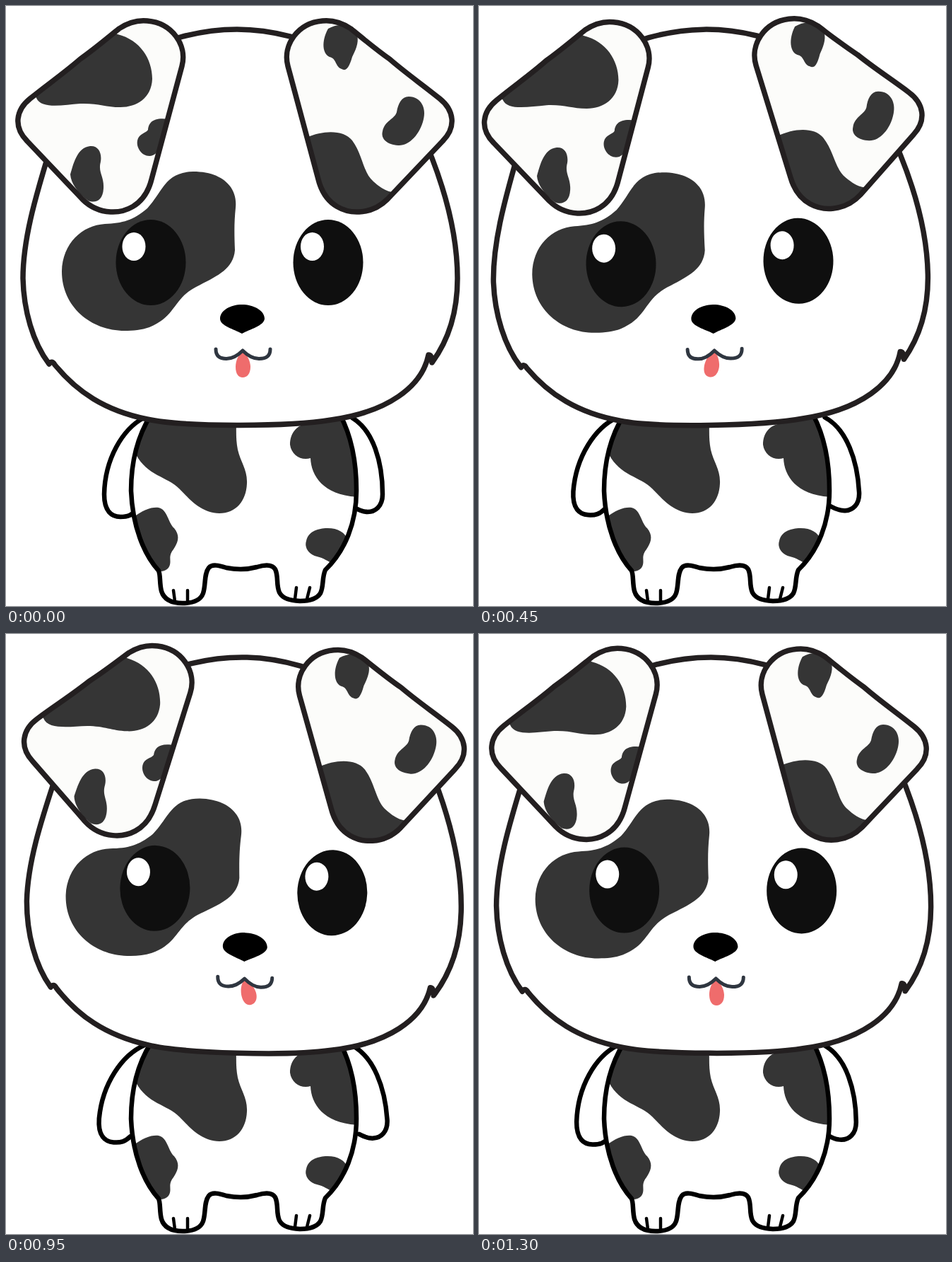
An HTML page for the animation above (1350 ms loop, 661 by 848 pixels).

```html
<!DOCTYPE html>
<html lang="en">
<head>
<meta charset="utf-8">
<title>Wobbling puppy</title>
<style>
  html, body { margin: 0; width: 100%; height: 100%; overflow: hidden; background: #fff; }
  svg { display: block; width: 100%; height: 100%; }
  .line { fill: none; stroke: #000; stroke-width: 6.5; stroke-linejoin: round; stroke-linecap: round; }
  .head { stroke: #231f20; stroke-width: 7.5; }
  .white { fill: #fff; }
  .ear { fill: #fcfcfa; }
  .spot { fill: #353535; }
  .eye { fill: #0f0f0f; }
</style>
</head>
<body>
<svg viewBox="0 0 661 848">
  <defs>
    <path id="bodyShape" d="M205 578C185 610 177 645 177 685C179 735 195 775 216 798C219 805 217 815 220 827C224 840 236 844 250 844C264 844 275 841 279 830C283 818 280 803 287 794C292 788 302 791 312 794C328 797 340 797 355 793C365 790 376 788 381 796C386 806 382 818 387 829C392 838 402 840 416 841C430 841 440 838 445 830C450 820 447 808 452 797C480 770 496 730 496 685C496 645 490 610 473 578Z"/>
    <path id="earShape" d="M160 32C175 22 190 20 200 21C235 24 257 55 249 85L206 245C196 285 165 292 148 291C130 290 118 283 108 273L30 191C10 171 14 147 34 131C60 110 82 95 105 75C125 61 145 44 160 32Z"/>
    <clipPath id="bodyClip"><use href="#bodyShape"/></clipPath>
    <clipPath id="earClip"><use href="#earShape"/></clipPath>
    <clipPath id="mirrorClip"><use href="#earShape" transform="matrix(-1 0 0 1 648 0)"/></clipPath>
  </defs>

  <path id="armL" class="line white" d="M195 582C165 598 140 640 139 690C139 715 150 722 162 722C172 722 178 720 185 712"/>
  <path id="armR" class="line white" d="M490 582C520 600 533 645 533 690C533 708 522 715 512 715C505 715 500 713 492 708"/>

  <use href="#bodyShape" class="white"/>
  <g class="spot" clip-path="url(#bodyClip)">
    <path d="M195 575H326C326 600 325 612 328 627C332 645 342 655 341 675C340 700 325 717 302 717C275 716 260 697 245 682C228 665 200 664 184 634Z"/>
    <path d="M178 724C195 712 205 708 216 709C229 712 229 730 238 738C248 750 242 760 237 768C228 779 236 785 230 794Q226 799 218 799L180 780Z"/>
    <path d="M428 590C410 592 402 605 402 620C404 635 418 643 431 639C432 665 450 692 500 694V575H430Z"/>
    <path d="M452 738C468 737 480 743 484 755L470 790L463 788C455 785 450 780 440 778C428 775 422 765 425 756C428 743 440 739 452 738Z"/>
  </g>
  <use href="#bodyShape" class="line"/>
  <path class="line" style="stroke-width:4.5" d="M237 826L239 841M257 826V841M411 822L409 838M430 822L426 838"/>

  <g id="head">
    <path class="line head white" d="M327 33C230 33 100 85 57 220C42 270 24 330 24 385C25 430 38 476 61 506Q65 500 69 507C100 545 140 572 200 584C250 595 400 595 460 585C540 574 589 538 598 493Q603 493 603 504C628 470 639 430 639 385C639 340 630 285 603 215C555 85 420 33 327 33Z"/>
    <path class="spot" d="M265 234C305 234 328 255 325 285C323 305 323 320 324 345C322 371 300 381 275 394C235 412 243 438 203 454C192 458 180 459 168 459C120 459 79 425 79 375C80 335 108 310 140 308C165 307 180 303 200 286C222 262 225 235 265 234Z"/>
    <g class="eye">
      <ellipse cx="205" cy="362.5" rx="49.5" ry="60.5"/>
      <ellipse cx="456" cy="362.5" rx="49.5" ry="60.5"/>
    </g>
    <g class="white">
      <ellipse cx="181" cy="340" rx="16.5" ry="20"/>
      <ellipse cx="433.5" cy="340" rx="16.5" ry="20"/>
    </g>
    <path d="M303 442C303 430 318 422 334 422C350 422 366 430 366 442C365 452 345 457 334 463C323 457 303 452 303 442Z"/>
    <path id="tongue" fill="#ef6c6c" d="M335 488C342 493 346 503 346 510C346 520 341 525 335 525C329 525 325 520 325 510C325 503 328 493 335 488Z"/>
    <path class="line" style="stroke:#2f3640;stroke-width:5" d="M297 485C297 496 304 498.5 312 498.5C322 498.5 330 492 335 487C340 492 348 498.5 358 498.5C367 498.5 374 496 374 485"/>

    <g id="earL">
      <use href="#earShape" class="ear"/>
      <g class="spot" clip-path="url(#earClip)">
        <path d="M158 40C190 48 207 75 207 103C206 130 185 143 162 143C140 143 130 137 105 138C80 140 50 146 43 130L20 100L120 20Z"/>
        <path d="M119 198C131 197 136 208 134 220C130 236 139 240 138 258C137 276 126 279 116 275C104 266 92 252 91 238C95 225 100 200 119 198Z"/>
        <path d="M230 160C208 157 202 165 201 175C198 180 188 180 186 190C184 200 192 212 203 212C210 212 214 207 218 200Z"/>
      </g>
      <use href="#earShape" class="line head"/>
    </g>
    <g id="earR">
      <use href="#earShape" class="ear" transform="matrix(-1 0 0 1 648 0)"/>
      <g class="spot" clip-path="url(#mirrorClip)">
        <path d="M456 32C470 24 490 24 497 42C500 52 494 64 490 72C485 90 480 92 475 89C466 86 468 74 458 72C448 68 446 50 456 32Z"/>
        <path d="M570 128C588 128 595 145 591 160C586 182 570 198 555 197C540 196 530 188 533 177C536 162 550 160 553 150C555 138 560 128 570 128Z"/>
        <path d="M425 186C450 175 478 175 490 190C505 210 505 235 520 248C530 257 537 261 546 263L520 305L450 295Z"/>
      </g>
      <use href="#earShape" class="line head" transform="matrix(-1 0 0 1 648 0)"/>
    </g>
  </g>
</svg>
<script>
const LOOP = 1350, STEP = 50, QUARTER = 1000 / 3;

const rotate = (id, degrees, x, y) =>
  document.getElementById(id).setAttribute('transform', `rotate(${degrees} ${x} ${y})`);

// Linear swing: 0, -1, 0, 1, 0, then a short rest until the loop ends
function swingAt(ms) {
  const q = Math.min(ms / QUARTER, 4);
  return q < 2 ? Math.abs(q - 1) - 1 : 1 - Math.abs(q - 3);
}

function draw(now) {
  const ms = Math.floor((now + 1) / STEP) * STEP % LOOP;
  const swing = swingAt(ms), lift = Math.abs(swing), left = swing < 0;
  rotate('head', (left ? 1.53 : 1.72) * swing, 331, 592);
  rotate('earL', 1.15 * lift, 245, 20);
  rotate('earR', (left ? -1.7 : -2.45) * lift, 410, -15);
  rotate('tongue', -19 * swing, 335, 488);
  rotate('armL', 5 * lift, 205, 590);
  rotate('armR', -4.5 * lift, 480, 590);
}

function tick() {
  draw(performance.now());
  requestAnimationFrame(tick);
}
tick();
</script>
</body>
</html>
```
